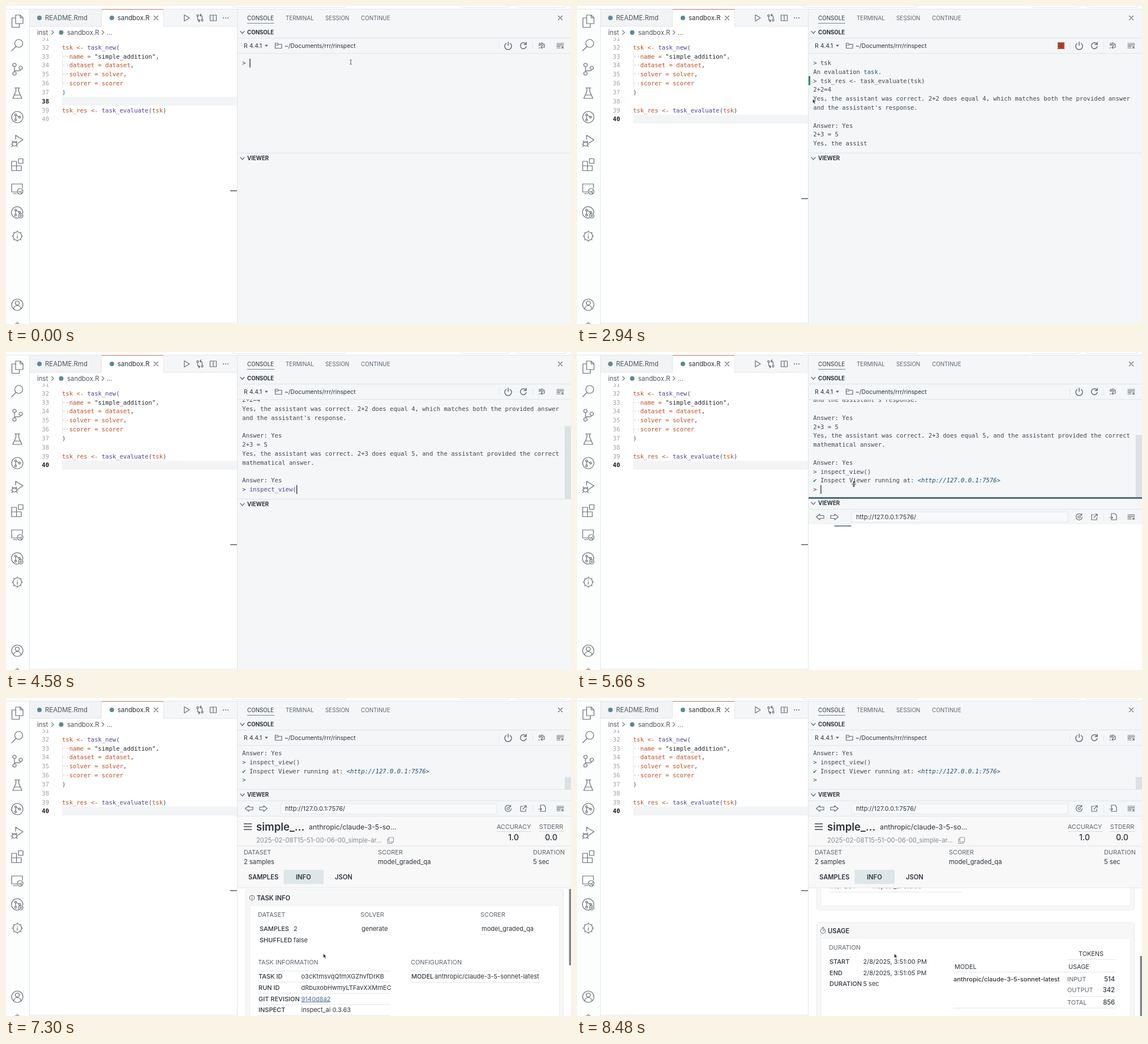
Write an HTML page that moves like this. It is 998 px wide and 561 px high and loops after 8.5 s.

```html
<!DOCTYPE html>
<html lang="en">
<head>
<meta charset="utf-8">
<title>Console and viewer session</title>
<style>
html, body { margin: 0; width: 100%; height: 100%; overflow: hidden; background: #fff; }
svg { display: block; width: 100vw; height: 100vh; }
text { font-family: Inter, "Open Sans", sans-serif; white-space: pre; }
.mono { font-family: "DejaVu Sans Mono", monospace; font-size: 10.57px; fill: #43484e; }
.var { fill: #bf4f24; } .fn { fill: #52439a; } .str { fill: #22272d; } .par { fill: #2b567c; }
.dot { fill: #b4bac0; } .kw { fill: #24598a; } .ok { fill: #1a7d4c; }
.link { fill: #1f4d72; font-style: italic; }
.icon { fill: none; stroke: #666d75; stroke-width: 1.2; stroke-linejoin: round; stroke-linecap: round; }
</style>
</head>
<body>
<svg id="stage" viewBox="0 0 998 561" preserveAspectRatio="none"></svg>
<script>
const LOOP = 8500, ROW = 15.8, CHAR = 6.364, SASH_OPEN = 259.5, SASH_UP = 161.5;
const INK = '#2f353b', MUTED = '#5e656d', LINE = '#e2e5e8', PANEL = '#f4f6f8';

// Drawing helpers; text is placed by the vertical centre of its capitals.
const esc = s => s.replace(/&/g, '&amp;').replace(/</g, '&lt;').replace(/>/g, '&gt;');
const label = (x, y, s, size = 11, fill = INK, weight = 400, more = '') =>
  `<text x="${x}" y="${y + size * 0.36}" font-size="${size}" fill="${fill}" font-weight="${weight}" ${more}>${esc(s)}</text>`;
const mono = (x, y, html, more = '') => `<text class="mono" x="${x}" y="${y + 3.85}" ${more}>${html}</text>`;
const box = (x, y, w, h, fill, more = '') =>
  `<rect x="${x}" y="${y}" width="${w}" height="${h}" fill="${fill}" ${more}/>`;
const rule = (x1, x2, y, fill = LINE) => box(x1, y - 0.5, x2 - x1, 1, fill);
const icon = (x, y, d, more = '') => `<path class="icon" transform="translate(${x} ${y})" d="${d}" ${more}/>`;
const ring = (x, y, r) => `M${x - r} ${y}a${r} ${r} 0 1 0 ${2 * r} 0a${r} ${r} 0 1 0 ${-2 * r} 0`;
const disc = (x, y, r, fill) => `<circle cx="${x}" cy="${y}" r="${r}" fill="${fill}"/>`;
const group = (id, body = '', more = '') => `<g id="${id}" ${more}>${body}</g>`;
const chevron = (x, y) => icon(x, y, 'M-3.5-2L0 2L3.5-2');

const clamp = v => Math.max(0, Math.min(1, v));
const ease = v => (v = clamp(v)) * v * (3 - 2 * v);
const span = (t, a, b) => ease((t - a) / (b - a));
const within = (t, a, b) => t >= a && t < b;

function highlight(code) {
  const pattern = /("[^"]*")|([a-z_]+(?=\())|([a-z_]+|<-|=)|([()])|(·+)/g;
  const kinds = ['str', 'fn', 'var', 'par', 'dot'];
  return code.replace(pattern, (m, ...g) =>
    `<tspan class="${kinds[g.findIndex(v => v !== undefined)]}">${esc(m)}</tspan>`);
}

function activityBar() {
  const graph = ring(-3, -4, 1.6) + ring(-3, 5, 1.6) + ring(4, 0, 1.6) + 'M-3-2.4v5.8M-2-3L3-1';
  const icons = [
    [27, 'M-3-11h8l5 5v10h-13zM5-11v5h5M-3-6h-6.500v16.500h13v-6'],
    [69, ring(2.5, -3, 7) + 'M-2.500 2.500L-10 10'],
    [111, ring(-5, -7, 3) + ring(6, -2, 3) + ring(-5, 8, 3) + 'M-5-4v9M6 1c0 5-11 0-11 4'],
    [154, 'M-4.500-9.500h9M-2.500-9.500v6l-5.500 12.500h16l-5.500-12.500v-6M-5 3h10'],
    [196, ring(0, 0, 10) + graph],
    [238, 'M-3-3v-7l13 8-9 6' + ring(-5, 5, 4) + 'M-9 3h8M-11 6h2M-1 6h2M-10 10l2-2M0 10l-2-2M-9 0l1 2M-1 0l-1 2'],
    [280, 'M-10-6h8.500v8h8.500v8.500h-17zM-10 2h8.500v8.500M2-10.500h8v8h-8z'],
    [322, 'M-1 6h-9v-14h19v7M-7 9h6' + ring(5, 5, 5) + 'M2.500 5l1.500 1.500M7.500 4l-2 2 2 2'],
    [364, 'M3 9.500a10 10 0 1 1 6.500-7.500' + graph + ring(6, 6, 4) + ring(6, 6, 1.5)],
    [406, ring(0, 0, 7.5) + 'M0-1v5M0-4v.5M0-9.500v2M0 7.500v2M-9.500 0h2M7.500 0h2M-6.700-6.700l1.400 1.400M6.700-6.700l-1.400 1.400M-6.700 6.700l1.400-1.400M6.700 6.700l-1.400-1.400'],
    [527, ring(0, 0, 10) + ring(0, -3, 3.5) + 'M-6.500 7.500c1-8 12-8 13 0'],
    [567, ring(0, 0, 7) + 'M-1-9h2']
  ];
  return box(0, 6, 41, 555, '#fcfdfd') + box(41, 6, 1, 555, LINE) +
    icons.map(([y, d]) => icon(20, y, d)).join('');
}

function editor() {
  const code = ['tsk <- task_new(', '··name = "simple_addition",', '··dataset = dataset,',
    '··solver = solver,', '··scorer = scorer', ')', '', 'tsk_res <- task_evaluate(tsk)', ''];
  const lineY = i => 72.8 + i * 15.85;
  return box(42, 6, 366, 30, '#f5f6f8') + box(42, 6, 126, 30, '#f1f3f5') + rule(42, 408, 36) +
    box(168, 6, 110, 31, '#fff') + box(168, 6, 1, 30, LINE) + box(278, 6, 1, 30, LINE) +
    box(169, 5.5, 109, 1.2, '#d98a6b') +
    disc(59, 21, 4, '#5f8794') + label(69, 21, 'README.Rmd', 11.4, '#50565d') +
    disc(187, 21, 4, '#5f8794') + label(197, 21, 'sandbox.R', 11.4) + icon(265, 21, 'M-3.500-3.500l7 7M3.500-3.500l-7 7') +
    icon(319, 21, 'M-4-5.500L5 0L-4 5.500z') +
    icon(342.5, 21, ring(-4, -4, 1.6) + ring(4, 4, 1.6) + 'M-4-2v4q0 3 4 3M-2 3l2 2-2 2M4 2v-4q0-3-4-3M2-7l-2 2 2 2') +
    icon(366, 21, 'M-5.500-5h11v10h-11zM0-5v10') +
    [384, 388, 392].map(x => disc(x, 21, 1, MUTED)).join('') +
    label(55, 46.7, 'inst', 11.4, '#50565d') + icon(82, 46.7, 'M-1.500-3.500L2 0L-1.500 3.500') +
    disc(97.5, 46.7, 4, '#5f8794') + label(108, 46.7, 'sandbox.R', 11.4, '#50565d') +
    icon(171, 46.7, 'M-1.500-3.500L2 0L-1.500 3.500') + label(178, 46.7, '...', 11.4, '#50565d') +
    box(99, 0, 309, 15.6, '#f2f4f5', 'id="lineGlow"') +
    `<g clip-path="url(#editorClip)">${mono(76, lineY(-1), '31', 'text-anchor="end" style="fill:#9ba1a8"')}</g>` +
    box(99, 81, 0.8, 63, '#dde1e4') +
    code.map((c, i) => mono(99, lineY(i), highlight(c)) +
      mono(76, lineY(i), 32 + i, `text-anchor="end" id="num${32 + i}"`)).join('') +
    box(396, 280, 12, 220, '#e1e3e5', 'id="slider"') + box(396, 0, 12, 1.6, '#60666c', 'id="mark"') +
    rule(42, 408, 559.5);
}

function listIcon(x, y) {
  return icon(x, y, 'M-6-4h12M-6-1.300h12M-6 1.300h6M-6 4h6M2.500 1.500l3 3M5.500 1.500l-3 3');
}

function consoleFrame() {
  const tabs = [[426, 'CONSOLE', INK], [494, 'TERMINAL', MUTED], [564, 'SESSION', MUTED], [627, 'CONTINUE', MUTED]];
  return box(408, 6, 590, 555, PANEL) +
    tabs.map(([x, s, c]) => label(x, 21, s, 9.8, c)).join('') + rule(426, 474, 30.5, '#7c858d') +
    icon(979, 21, 'M-3.500-3.500l7 7M3.500-3.500l-7 7') +
    chevron(417.5, 46.5) + label(426, 46.5, 'CONSOLE', 9.7, INK, 700) + rule(409, 998, 56.5) +
    label(420, 70.3, 'R 4.4.1', 10.5) + `<path d="M457 68.500h6l-3 3.500z" fill="${MUTED}"/>` +
    icon(481, 70, 'M-5.500 4.500v-9h4l1.500 2h6v7zM-5.500-1h5l1-1.500') + label(492, 70.3, '~/Documents/rrr/rinspect', 10.4) +
    group('stop', box(849, 64, 12, 12, '#b5553f') + box(851, 66, 8, 8, '#9d3f2c')) +
    box(870.5, 64, 1, 12, LINE) + icon(887, 70, 'M-3.500-4a6 6 0 1 0 7 0M0-6.500v6', 'style="stroke-width:1.5"') +
    icon(914, 70, 'M4.500-2.500a5.300 5.300 0 1 0 .5 4M5-6v4h-4', 'style="stroke-width:1.5"') + box(930, 64, 1, 12, LINE) +
    label(940.5, 67.5, 'ab', 8, MUTED, 600) + icon(946, 70, 'M5-3v6h-6M1 1l-2 2 2 2M-5 4h2') +
    listIcon(979, 70) + rule(409, 998, 83.7) +
    `<g clip-path="url(#consoleClip)">${group('rows')}${box(409, 124, 3, 16, '#2a8a5c', 'id="running"')}
    ${box(0, 0, 1.4, 15.5, INK, 'id="caret"')}</g>` + box(987, 0, 11, 1, '#dbe2e7', 'id="thumb"');
}

// Laid out for the raised sash; the group is shifted while the sash is lower.
function viewerFrame() {
  const summary = [[420, 'DATASET', '2 samples'], [657, 'SCORER', 'model_graded_qa'], [931, 'DURATION', '5 sec']];
  const toolbar = rule(409, 998, 181.5) + icon(429, 195, 'M7-2.500h-7v-2.500l-6.500 5 6.500 5v-2.500h7z') +
    icon(455, 195, 'M-7-2.500h7v-2.500l6.500 5-6.500 5v-2.500h-7z') +
    box(485, 186, 382, 18.5, '#f8f9fa', `rx="2" stroke="${LINE}"`) + label(493, 195, 'http://127.0.0.1:7576/', 11) +
    icon(887, 195, 'M4-4a5.500 5.500 0 1 0 1.500 4M4.500-6v3h-3' + ring(0, 0, 2)) +
    icon(914, 195, 'M-1-4h-4v9h9v-4M1-5h4v4M5-5L-1 1') + box(930, 189, 1, 12, LINE) +
    icon(947, 195, 'M-3-1v-5h6l3 3v8h-9v-2M-6 1h5M-3-1l2 2-2 2') + listIcon(979, 195) +
    box(409, 208, 589, 500, '#fff');
  const header = box(409, 208, 589, 127, '#f8f8f9') + rule(409, 998, 208.5) +
    icon(427, 227, 'M-6.500-5h13M-6.500 0h13M-6.500 5h13', 'style="stroke-width:1.6;stroke:#40464c"') +
    label(442, 227, 'simple_...', 18.5, INK, 600) + label(535, 227.5, 'anthropic/claude-3-5-so...', 12.3) +
    label(442, 251, '2025-02-08T15-51-00-06-00_simple-ar...', 11.2, '#868c92') +
    icon(679, 251, 'M-2.500-5h8v8h-8zM-2.500-2.500h-2.500v8h8v-2.500', 'style="stroke:#8d9399;stroke-width:1"') +
    label(897, 227, 'ACCURACY', 10.9, MUTED, 400, 'text-anchor="middle"') + rule(867, 928, 235.5, '#d5d8db') +
    label(963, 227, 'STDERR', 10.9, MUTED, 400, 'text-anchor="middle"') + rule(941, 985, 235.5, '#d5d8db') +
    label(896.5, 245.5, '1.0', 14.3, INK, 500, 'text-anchor="middle"') +
    label(963, 245.5, '0.0', 14.3, INK, 500, 'text-anchor="middle"') + rule(409, 998, 261) +
    summary.map(([x, a, b]) => label(x, 271.8, a, 10.9, MUTED) + label(x, 288.7, b, 11.2)).join('');
  return chevron(417.5, 171) + label(426, 171, 'VIEWER', 9.7, INK, 700) +
    group('toolbar', toolbar) + box(0, 210, 30, 1.8, '#61788d', 'id="loading"') +
    group('report', header + group('samples', samplesTab()) + group('info', infoTab()));
}

function tabStrip(y, active) {
  return [[428, 'SAMPLES', 420], [512, 'INFO', 490.5], [581, 'JSON', 561]].map(([x, s, bx]) =>
    (s === active ? box(bx, y - 12.5, 70.5, 25, '#dee6ea', 'rx="2"') : '') + label(x, y, s, 11.2, INK, 600)).join('');
}

function samplesTab() {
  const heads = [[422, 'ID'], [460, 'INPUT'], [702, 'TARGET'], [777, 'ANSWER'], [945, 'SCORE']];
  const row = (y, cells) =>
    [423, 460, 702, 777].map((x, i) => label(x, y, cells[i], 12.3, INK, 500)).join('') +
    disc(964, y - 1, 8.8, '#1e7f4f') + label(964, y - 1, 'C', 10.5, '#fff', 400, 'text-anchor="middle"');
  return box(409, 300, 589, 55, '#f8f8f9') + label(667, 314, 'FILTER:', 10.9, MUTED) +
    box(710, 304, 262, 20.5, '#fff', 'stroke="#eceef0"') + icon(983, 314, ring(0, 0, 4.3), 'style="stroke-width:1"') +
    label(983, 314, '?', 7, MUTED, 500, 'text-anchor="middle"') +
    tabStrip(337, 'SAMPLES') + label(858, 339, 'SORT:', 10.9, MUTED) +
    box(894.5, 328.5, 93, 21, '#fff', `rx="3" stroke="${LINE}"`) + label(903, 339, 'sample asc', 11.2) + chevron(978, 339.5) +
    rule(409, 998, 355) + heads.map(([x, s]) => label(x, 367.8, s, 10.9, MUTED)).join('') +
    [380, 457, 535].map(y => rule(409, 998, y)).join('') +
    row(402.5, ['1', "What's 2+2?", '4', '2+2=4']) + row(480, ['2', "What's 2+3?", '5', '2+3 = 5']) +
    box(410, 381, 587, 75, 'none', 'stroke="#cbd6df" stroke-width="2" id="hover"');
}

function infoTab() {
  const card = (top, bottom, mark, title) =>
    box(423.5, top, 561, bottom - top, '#f7f7f8', 'rx="2" stroke="#e9ebed"') +
    box(430.5, top + 28, 547, bottom - top - 35, '#fff', 'stroke="#eceeef"') +
    icon(434.5, top + 14.5, mark, 'style="stroke-width:1.1"') + label(443, top + 14.5, title, 11.2, INK, 600);
  const pairs = (x, vx, y, list, step = 19.7) => list.map(([a, b], i) =>
    label(x, y + i * step, a, 11, INK, 500) + label(vx, y + i * step, b, 11)).join('');
  const clock = ring(0, 0.5, 4.2) + 'M0-5.500v1.500M-1.500-6h3M0 .5l1.800-1.800';
  const scroll =
    card(341, 595, ring(0, 0, 4.2) + 'M0-.5v2.500M0-2.500v.3', 'TASK INFO') +
    label(445, 385, 'DATASET', 10.9, MUTED) + pairs(448, 508, 410, [['SAMPLES', '2'], ['SHUFFLED', 'false']]) +
    label(626, 385, 'SOLVER', 10.9, MUTED) + label(628, 410, 'generate') +
    label(838, 385, 'SCORER', 10.9, MUTED) + label(840, 410, 'model_graded_qa') + rule(838, 848, 420) +
    label(445, 469, 'TASK INFORMATION', 10.9, MUTED) + label(715, 469, 'CONFIGURATION', 10.9, MUTED) +
    [484.5, 504.3, 524, 543.7, 563.4].map(y => rule(446, 679, y)).join('') + rule(715, 944, 484.5) + rule(715, 944, 504.5) +
    pairs(446, 521.5, 494.3, [['TASK ID', 'o3cKtmsvqQtmXGZhvfDrKB'], ['RUN ID', 'dRbuxobHwmyLTFavXXMmEC'], ['GIT REVISION', ''], ['INSPECT', 'inspect_ai 0.3.63']]) +
    label(521.5, 533.7, '9140d8a2', 11, '#4d6f93', 400, 'text-decoration="underline"') +
    pairs(716, 757, 494.3, [['MODEL', 'anthropic/claude-3-5-sonnet-latest']]) +
    card(617, 800, clock, 'USAGE') + label(445, 661.5, 'DURATION', 10.9, MUTED) +
    pairs(446, 505.5, 686.3, [['START', '2/8/2025, 3:51:00 PM'], ['END', '2/8/2025, 3:51:05 PM'], ['DURATION', '5 sec']], 19.3) +
    label(908, 672.3, 'TOKENS', 10.9, INK, 400, 'text-anchor="middle"') + rule(867, 951, 682.5) +
    label(667, 695, 'MODEL', 10.9) + label(868, 695, 'USAGE', 10.9) + rule(665, 951, 704.5) +
    label(665, 716.8, 'anthropic/claude-3-5-sonnet-latest', 11, INK, 500) +
    [['INPUT', 514, 716.8], ['OUTPUT', 342, 736.3], ['TOTAL', 856, 758]].map(([a, n, y]) =>
      label(866, y, a, 10.9, MUTED) + label(950, y, String(n), 11.2, INK, 500, 'text-anchor="end"')).join('') +
    rule(867, 951, 747.5) + rule(665, 951, 768);
  return tabStrip(315.8, 'INFO') + rule(409, 998, 335) +
    `<g clip-path="url(#infoClip)">${group('infoScroll', scroll)}${box(994.5, 335, 3.5, 135, '#7f868c', 'id="infoThumb" rx="1"')}</g>`;
}

const pointers = {
  arrow: '<path d="M0 0v7.500l1.800-1.600 1.400 3 1.200-.6-1.400-2.800h2.400z" fill="#222" stroke="#fff" stroke-width=".5"/>',
  ibeam: '<path d="M-1.600-4q1.600 0 1.600 1q0-1 1.600-1M0-3v6M-1.600 4q1.600 0 1.600-1q0 1 1.600 1" fill="none" stroke="#444" stroke-width=".9"/>',
  hand: '<path d="M-2.500-4q1-.8 1.500 0v2.500l3.500.8q1.200.4.9 1.700l-.7 2.500h-3.700l-2.500-3.200q.2-1 1.200-.3z" fill="#fff" stroke="#333" stroke-width=".9"/>',
  resize: '<path d="M-4 0h8M0-4v8M-1.500-2.500L0-4.500L1.500-2.500M-1.500 2.500L0 4.500L1.500 2.500" fill="none" stroke="#333" stroke-width="1.1"/>'
};
const path = [
  [0, 609, 99, 'ibeam'], [900, 609, 99, 'ibeam'], [1250, 300, 186, 'ibeam'], [1500, 300, 186, 'ibeam'],
  [1800, 416.5, 164, 'arrow'], [4850, 416.5, 164, 'arrow'], [5450, 489, 258, 'resize'], [5560, 489, 258, 'resize'],
  [5660, 489, 233, 'resize'], [5840, 489, 163, 'resize'], [5950, 489, 163, 'arrow'], [6250, 555, 407, 'hand'],
  [6550, 555, 407, 'hand'], [6800, 526, 337, 'hand'], [6980, 526, 322, 'arrow'], [7200, 560.5, 451, 'arrow'], [LOOP, 560.5, 451, 'arrow']
];

const stage = document.getElementById('stage');
stage.innerHTML = `<defs>
  <clipPath id="editorClip">${box(42, 56, 366, 505)}</clipPath>
  <clipPath id="consoleClip">${box(409, 84.5, 589, 175, '', 'id="consoleArea"')}</clipPath>
  <clipPath id="infoClip">${box(409, 335.5, 589, 226)}</clipPath></defs>` +
  box(0, 0, 998, 561, '#fff') + rule(0, 998, 5.5) +
  [[400, 200], [803, 85], [901, 89]].map(([x, w]) => box(x, -12, w, 14.5, '#fff', `rx="3" stroke="${LINE}"`)).join('') +
  activityBar() + editor() + consoleFrame() + group('viewer', rule(409, 998, SASH_UP) + viewerFrame()) +
  box(409, 0, 589, 3, '#4a6c78', 'id="sash"') + box(408, 6, 1, 555, LINE) +
  group('badge', disc(27, 118, 7, '#35687c') + icon(27, 118, ring(0, 0, 3.8) + 'M0-2v2h1.800', 'style="stroke:#fff"')) +
  group('pointer');

const $ = id => document.getElementById(id);
const show = (id, on) => $(id).setAttribute('display', on ? 'inline' : 'none');
const put = (id, attrs) => Object.entries(attrs).forEach(([k, v]) => $(id).setAttribute(k, v));
const shift = (id, x, y) => put(id, { transform: `translate(${x} ${y})` });

const answer = ['2+2=4', 'Yes, the assistant was correct. 2+2 does equal 4, which matches both the provided answer',
  "and the assistant's response.", '', 'Answer: Yes', '2+3 = 5',
  'Yes, the assistant was correct. 2+3 does equal 5, and the assistant provided the correct',
  'mathematical answer.', '', 'Answer: Yes'];
const answerLength = answer.join('').length;
const typed = (s, t, start, step) => s.slice(0, Math.max(0, Math.floor((t - start) / step) + 1));

function consoleRows(t) {
  const rows = [];
  let input = '';
  const add = s => rows.push(esc(s));
  const prompt = (s = '') => { input = s; rows.push('&gt; ' + highlight(s)); };
  if (t < 700) {
    prompt(typed('tsk', t, 300, 110));
    return { rows, input };
  }
  add('> tsk');
  rows.push('An evaluation <tspan class="kw">task</tspan>.');
  if (t < 1500) {
    prompt();
    return { rows, input };
  }
  add('> tsk_res <- task_evaluate(tsk)');
  let left = Math.floor(clamp((t - 2100) / 1400) * answerLength);
  for (const line of answer) {
    if (left <= 0 && t < 3500) break;
    add(t < 3500 ? line.slice(0, left) : line);
    left -= line.length;
  }
  if (t >= 4800) {
    add('> inspect_view()');
    rows.push('<tspan class="ok">✔</tspan> Inspect Viewer running at: <tspan class="link">&lt;http://127.0.0.1:7576&gt;</tspan>');
    prompt();
  } else if (t >= 3550) {
    prompt(typed('inspect_view()', t, 3740, 70));
  }
  return { rows, input };
}

function drawConsole(t, sash) {
  const { rows, input } = consoleRows(t), n = rows.length;
  const bottom = sash > 257 ? 242.3 : sash - 17;
  const last = Math.min(100.5 + (n - 1) * ROW, bottom);
  $('rows').innerHTML = rows.map((r, i) => mono(417.3, last - (n - 1 - i) * ROW, r)).join('');
  put('caret', { x: 417.3 + CHAR * (2 + input.length) + 0.2, y: last - 7.5 });
  show('caret', t < 1250 || within(t, 3550, 5950));
  const view = sash - 84, size = view * view / (n * ROW + 18);
  put('thumb', { y: sash - size, height: size });
  show('thumb', n > 10);
  put('consoleArea', { height: sash - 84.5 });
  const busy = within(t, 1500, 3550);
  show('stop', busy);
  show('running', busy);
  put('running', { y: last - (n - 3) * ROW - 8 });
}

function drawEditor(t) {
  const current = t < 1500 ? 38 : 40;
  put('lineGlow', { y: 65 + (current - 32) * 15.85 });
  put('mark', { y: current === 38 ? 325.2 : 339 });
  for (let n = 32; n <= 40; n++) {
    $('num' + n).style.fill = n === current ? '#15191d' : '#9ba1a8';
    $('num' + n).style.fontWeight = n === current ? 700 : 400;
  }
  show('slider', within(t, 1100, 2200));
  show('badge', within(t, 3500, 4400));
}

function drawViewer(t, sash) {
  const info = t >= 6950;
  shift('viewer', 0, sash - SASH_UP);
  show('toolbar', t >= 4950);
  show('loading', within(t, 4950, 5740));
  put('loading', { x: 409 + (t - 4950) * 0.317 % 180 });
  show('report', t >= 5740);
  show('samples', !info);
  show('info', info);
  show('hover', within(t, 6180, 6720));
  const scroll = 85 * span(t, 7250, 7700) + 136 * span(t, 7800, 8350);
  shift('infoScroll', 0, -scroll);
  put('infoThumb', { y: 335 + scroll * 0.543 });
  put('sash', { y: sash - 1.5 });
  show('sash', within(t, 5500, 5960));
}

function drawPointer(t) {
  const i = path.findIndex((p, k) => t < path[k + 1][0]);
  const [t0, x0, y0, shape] = path[i], [t1, x1, y1] = path[i + 1];
  const k = span(t, t0, t1);
  $('pointer').innerHTML = pointers[shape];
  shift('pointer', x0 + (x1 - x0) * k, y0 + (y1 - y0) * k);
  show('pointer', !within(t, 300, 900) && !within(t, 3700, 4850));
}

function sashAt(t) {
  if (t < 5660) return SASH_OPEN - 2 * span(t, 5600, 5650);
  return 257.5 + (SASH_UP - 257.5) * span(t, 5670, 5880);
}

function render(t) {
  const sash = sashAt(t);
  drawEditor(t);
  drawConsole(t, sash);
  drawViewer(t, sash);
  drawPointer(t);
}

const start = performance.now();
function tick() {
  render((performance.now() - start) % LOOP);
  requestAnimationFrame(tick);
}
tick();
</script>
</body>
</html>
```
